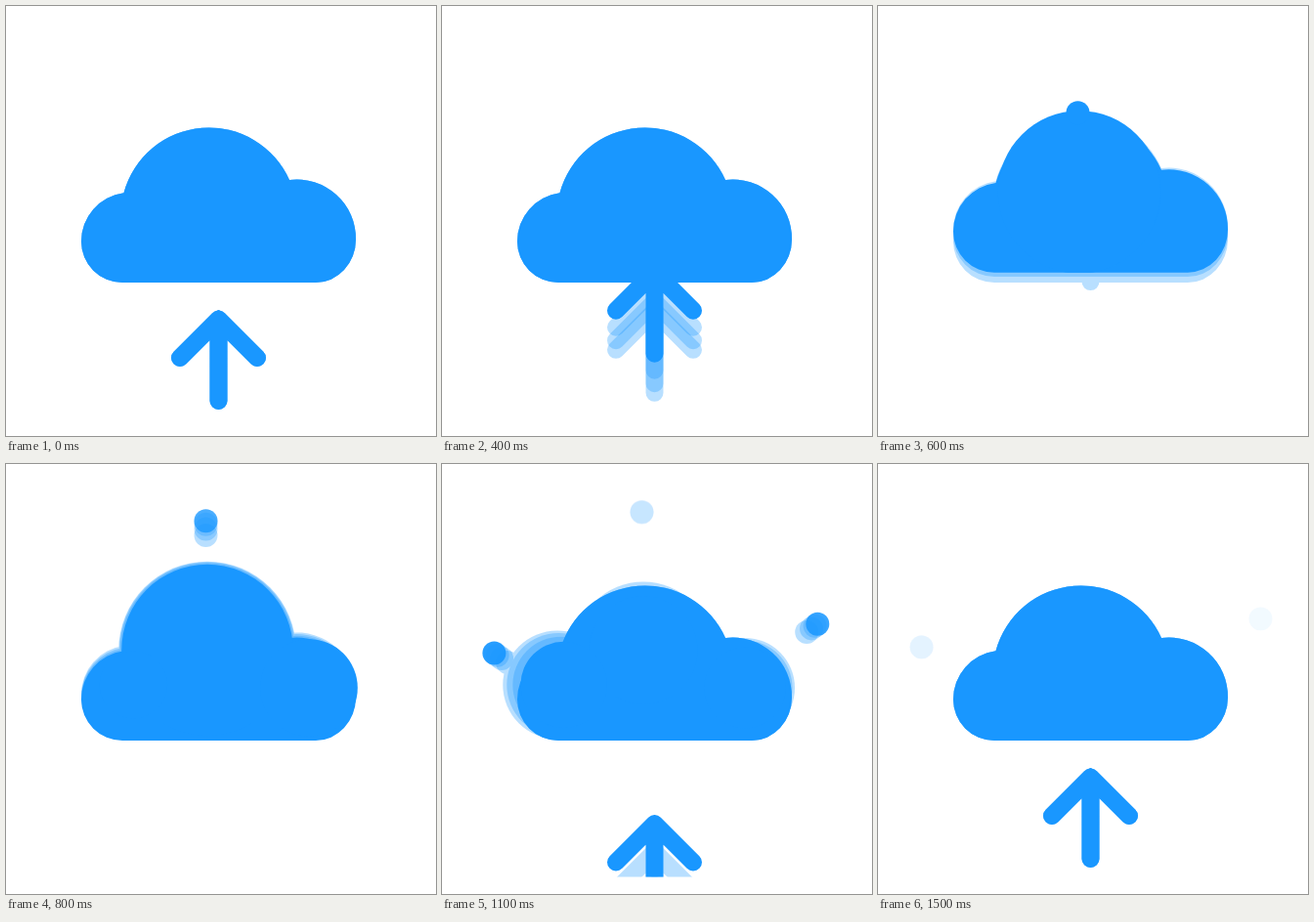
An HTML page with a canvas that plays this animation: 440x440 px, repeating every 1600 ms.

```html
<!DOCTYPE html>
<html lang="en">
<head>
<meta charset="utf-8">
<title>Cloud upload</title>
<style>
  html, body { margin: 0; width: 100%; height: 100%; overflow: hidden; background: #fff; }
  canvas { display: block; width: 440px; height: 440px; }
</style>
</head>
<body>
<canvas id="stage" width="440" height="440"></canvas>
<script>
const SIZE = 440, LOOP = 1600, STEP = 100, TRAIL = 3, TRAIL_ALPHA = 0.3;
const BLUE = '#1997ff', FLOOR = 422.5, CLOUD_BOTTOM = 283;
const ctx = document.getElementById('stage').getContext('2d');
const layer = document.createElement('canvas');
layer.width = layer.height = SIZE;
const g = layer.getContext('2d');

const cloud = new Path2D('M119 283A42 42 0 0 1 77 241A50 50 0 0 1 120.5 191.2' +
  'A90.2 90.2 0 0 1 290 178A60.5 60.5 0 0 1 358 239A41 44 0 0 1 317 283Z');
const arrow = new Path2D('M217.5 404V320.5M178 360L217.5 320.5L257 360');

// A bubble swells out of the cloud around its peak time; a drop flies out of it.
const bursts = [
  { launch: 505, from: [204.5, 191], to: [204.5, 48],
    bubble: { x: 206, y: 190.5, size: 91, peak: 670, fall: 688, drift: 0 } },
  { launch: 835, from: [310, 219], to: [392, 158],
    bubble: { x: 310, y: 229, size: 55.2, peak: 875, fall: 456, drift: 0 } },
  { launch: 866, from: [120, 240], to: [44, 187],
    bubble: { x: 117, y: 226, size: 57, peak: 950, fall: 317, drift: 0.6 } }
];
const RISE = 240, FLIGHT = 112, LIFE = 620, FADE = 410;

const clamp = v => Math.max(0, Math.min(1, v));
const ramp = (t, a, b) => clamp((t - a) / (b - a));
const mix = (a, b, p) => a + (b - a) * p;

// Speeds up into the cloud, then slows to rest from below.
function arrowShift(t) {
  return t < 800
    ? -180 * ramp(t, 230, 558) ** 2
    : 47.5 * Math.max(0, (1200 - t) / 100) ** 1.65;
}

function cloudShift(t) {
  return -12 * Math.min(ramp(t, 500, 567), 1 - ramp(t, 567, 800));
}

function disc(x, y, r) {
  g.beginPath();
  g.arc(x, y, r, 0, Math.PI * 2);
  g.fill();
}

function drawBubble({ x, y, size, peak, fall, drift }, t) {
  const width = t < peak ? RISE : fall;
  const r = size * clamp(1 - ((t - peak) / width) ** 2);
  disc(x + (size - r) * drift, y, r);
}

function drawDrop({ launch, from, to }, t) {
  const age = t - launch;
  if (age < 0) return;
  const p = 1 - Math.exp(-age / FLIGHT);
  g.globalAlpha = clamp((LIFE - age) / FADE);
  disc(mix(from[0], to[0], p), mix(from[1], to[1], p), 12);
  g.globalAlpha = 1;
}

function clipBelow(y) {
  g.beginPath();
  g.rect(0, 0, SIZE, y);
  g.clip();
}

function drawPose(t) {
  const lift = cloudShift(t);
  g.clearRect(0, 0, SIZE, SIZE);
  g.fillStyle = g.strokeStyle = BLUE;
  g.lineWidth = 18;
  g.lineCap = g.lineJoin = 'round';

  g.save();
  clipBelow(FLOOR);
  g.translate(0, arrowShift(t));
  g.stroke(arrow);
  g.restore();

  g.save();
  g.translate(0, lift);
  g.fill(cloud);
  g.restore();

  g.save();
  clipBelow(CLOUD_BOTTOM + lift);
  for (const burst of bursts) drawBubble(burst.bubble, t);
  g.restore();

  for (const burst of bursts) drawDrop(burst, t);
}

function render(now) {
  const t = Math.floor((now % LOOP) / STEP) * STEP;
  ctx.globalAlpha = 1;
  ctx.fillStyle = '#fff';
  ctx.fillRect(0, 0, SIZE, SIZE);
  // Faint earlier poses lie under the current one.
  for (let i = TRAIL; i >= 0; i--) {
    drawPose(t - i * STEP / TRAIL);
    ctx.globalAlpha = i ? TRAIL_ALPHA : 1;
    ctx.drawImage(layer, 0, 0);
  }
}

const start = performance.now();
function tick() {
  render(performance.now() - start);
  requestAnimationFrame(tick);
}
tick();
</script>
</body>
</html>
```
